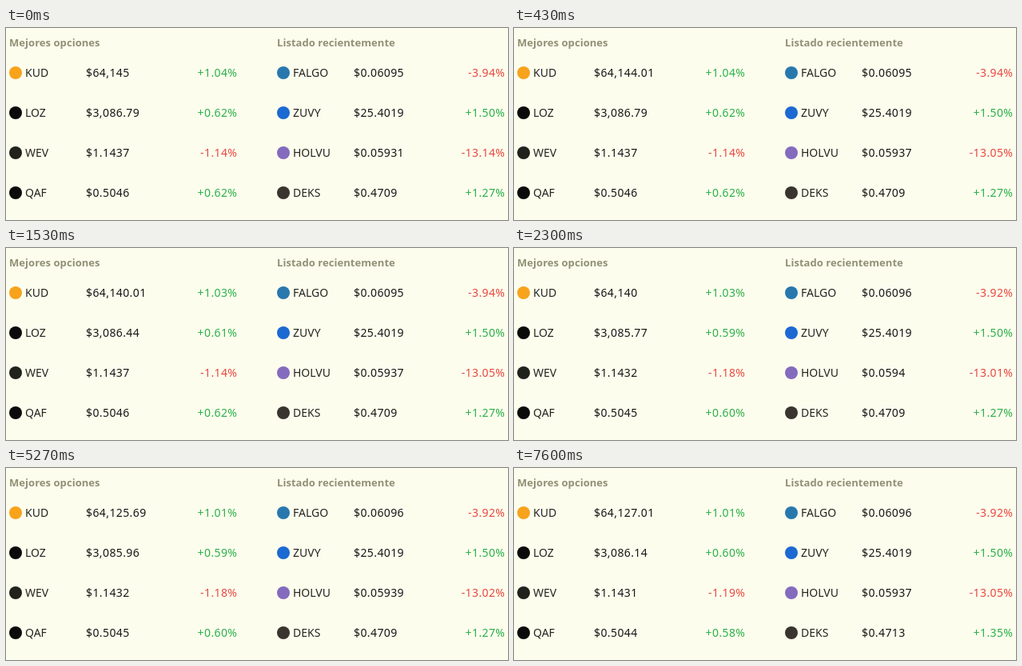
These frames come from a looping animation (628 px wide and 240 px high, 8000 ms). An HTML page:

```html
<!DOCTYPE html>
<html lang="es">
<head>
<meta charset="utf-8">
<title>Mercado</title>
<style>
html, body { margin: 0; width: 100%; height: 100%; overflow: hidden; background: #fdfdee; }
svg { display: block; width: 628px; height: 240px; }
text { font: 400 14px "Noto Sans", "Open Sans", sans-serif; fill: #171815; letter-spacing: .4px; }
.head { font-size: 13px; font-weight: 600; fill: #909175; letter-spacing: .05px; }
.coin { font-weight: 300; fill: #24251f; letter-spacing: 0; }
.change { font-weight: 500; text-anchor: end; }
.up { fill: #2bb147; }
.down { fill: #e9473d; }
</style>
</head>
<body>
<svg id="board" viewBox="0 0 628 240"></svg>
<script>
const LOOP = 8000;
const board = document.getElementById('board');

// Each quote is [time in ms, price, change]
const columns = [
  { x: 4, title: 'Mejores opciones', rows: [
    { coin: 'KUD', color: '#f7a31c', quotes: [
      [0, '64,145', '+1.04'], [300, '64,144.01', '+1.04'],
      [1530, '64,140.01', '+1.03'], [2000, '64,139.99', '+1.02'],
      [2300, '64,140', '+1.03'], [3600, '64,116.92', '+1.00'],
      [4570, '64,125.69', '+1.01'], [5600, '64,125.70', '+1.01'],
      [6300, '64,126.99', '+1.01'], [7030, '64,127.00', '+1.01'],
      [7600, '64,127.01', '+1.01']] },
    { coin: 'LOZ', color: '#0b0b0b', quotes: [
      [0, '3,086.79', '+0.62'], [570, '3,086.44', '+0.61'],
      [1570, '3,085.77', '+0.59'], [2570, '3,085.96', '+0.59'],
      [7070, '3,086.14', '+0.60']] },
    { coin: 'WEV', color: '#20221c', quotes: [
      [0, '1.1437', '-1.14'], [1630, '1.1433', '-1.17'],
      [2070, '1.1432', '-1.18'], [7130, '1.1431', '-1.19']] },
    { coin: 'QAF', color: '#0b0b0b', quotes: [
      [0, '0.5046', '+0.62'], [1770, '0.5045', '+0.60'],
      [7270, '0.5044', '+0.58']] }
  ] },
  { x: 339, title: 'Listado recientemente', rows: [
    { coin: 'FALGO', color: '#2878ae', quotes: [
      [0, '0.06095', '-3.94'], [2300, '0.06096', '-3.92']] },
    { coin: 'ZUVY', color: '#1b69d2', quotes: [[0, '25.4019', '+1.50']] },
    { coin: 'HOLVU', color: '#846bbd', quotes: [
      [0, '0.05931', '-13.14'], [300, '0.05937', '-13.05'],
      [2300, '0.0594', '-13.01'], [2800, '0.05934', '-13.09'],
      [5270, '0.05939', '-13.02'], [6300, '0.05937', '-13.05']] },
    { coin: 'DEKS', color: '#39352e', quotes: [
      [0, '0.4709', '+1.27'], [6800, '0.4713', '+1.35']] }
  ] }
];

function add(tag, attrs, text = '') {
  const node = document.createElementNS('http://www.w3.org/2000/svg', tag);
  for (const key in attrs) node.setAttribute(key, attrs[key]);
  node.textContent = text;
  return board.appendChild(node);
}

const rows = [];
for (const { x, title, rows: list } of columns) {
  add('text', { x, y: 23, class: 'head' }, title);
  list.forEach(({ coin, color, quotes }, i) => {
    const mid = 56 + i * 50, y = mid + 5;
    add('circle', { cx: x + 8, cy: mid, r: 8, fill: color });
    add('text', { x: x + 20, y, class: 'coin' }, coin);
    rows.push({
      quotes,
      price: add('text', { x: x + 96, y }),
      change: add('text', { x: x + 285.4, y }),
      shown: null
    });
  });
}

function draw(now) {
  const t = now % LOOP;
  for (const row of rows) {
    const quote = row.quotes.findLast(q => q[0] <= t);
    if (quote === row.shown) continue;
    row.shown = quote;
    row.price.textContent = '$' + quote[1];
    row.change.textContent = quote[2] + '%';
    row.change.setAttribute('class', 'change ' + (quote[2][0] === '+' ? 'up' : 'down'));
  }
}

const start = performance.now();
function tick() {
  draw(performance.now() - start);
  requestAnimationFrame(tick);
}
tick();
</script>
</body>
</html>
```
